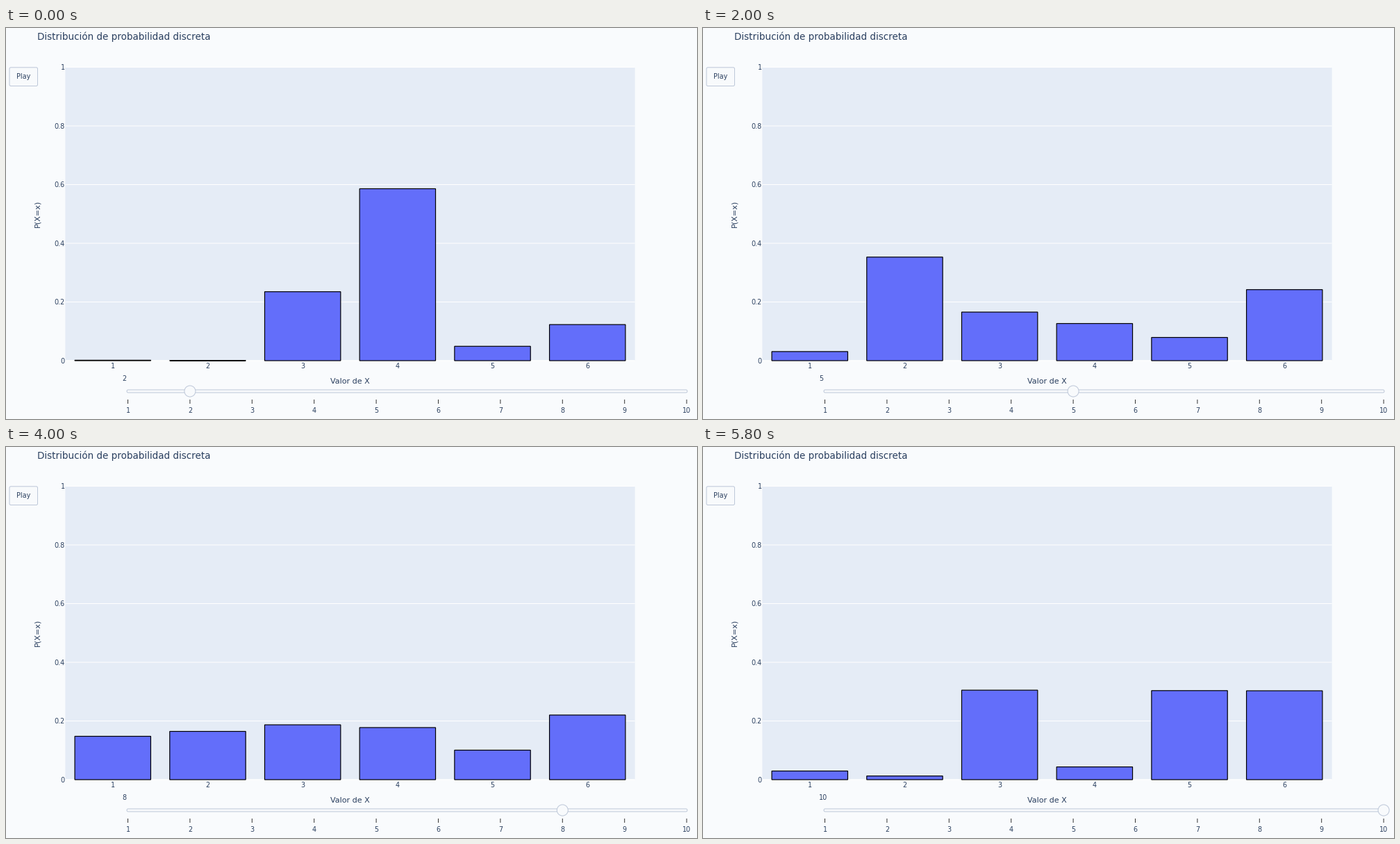
These frames come from a looping animation (995 by 563 pixels, 6.2 s). A matplotlib script:

```python
import numpy as np
import matplotlib.pyplot as plt
from matplotlib.animation import FuncAnimation
from matplotlib.patches import Circle, FancyBboxPatch, Rectangle

W, H, DPI = 995, 563, 64
STEP_MS, LOOP_MS, MOVE_MS = 100, 6200, 500

PAPER, PLOT, BAR = "#f9fbfd", "#e5ecf6", "#636efa"
INK, BORDER, CONTROL = "#2a3f5f", "#bec8d9", "#f8fafc"

LEFT, RIGHT, TOP, BASE = 85.4, 905.6, 56.5, 479
SLOT = (RIGHT - LEFT) / 6
BAR_W = 0.8 * SLOT
RAIL_X, RAIL_Y, RAIL_STEP = 175.5, 523, 89.4

# Probabilities of the six values, one row per slider position.
STATES = np.array([
    [.0015, .0005, .235, .540, .049, .123],
    [.0015, .0005, .235, .5865, .049, .123],
    [.0285, .104, .0385, .4945, .311, .020],
    [.031, .193, .197, .162, .110, .305],
    [.031, .455, .1455, .104, .0595, .202],
    [.2715, .336, .2296, .012, .0995, .0485],
    [.152, .1625, .1787, .1965, .070, .238],
    [.1095, .183, .263, .0025, .3835, .056],
    [.120, .140, .405, .060, .170, .105],
    [.0295, .0125, .305, .0435, .3035, .303],
])
# Moment at which each move to the next row begins.
STARTS = np.array([-430, 260, 1020, 1730, 2460, 3220, 3855, 4610, 5320])


def px(size):
    """Pixels to points."""
    return size * 72 / DPI


def cubic_in_out(t):
    t = min(max(t, 0), 1)
    return 4 * t**3 if t < .5 else 1 - 4 * (1 - t)**3


plt.rcParams["font.family"] = "DejaVu Sans"
plt.rcParams["path.snap"] = False
fig = plt.figure(figsize=(W / DPI, H / DPI), dpi=DPI, facecolor=PAPER)
ax = fig.add_axes([0, 0, 1, 1])
ax.set_xlim(0, W)
ax.set_ylim(H, 0)
ax.axis("off")


def label(x, y, text, size=9.6, ha="center", **kw):
    return ax.text(x, y, text, fontsize=px(size), color=INK, ha=ha,
                   va=kw.pop("va", "baseline"), **kw)


def rule(xs, ys, color, width, z=1):
    ax.plot(xs, ys, color=color, lw=px(width), zorder=z,
            solid_capstyle="butt")


def rounded(x, y, w, h, radius):
    ax.add_patch(FancyBboxPatch(
        (x, y), w, h, boxstyle=f"round,pad=0,rounding_size={radius}",
        fc=CONTROL, ec=BORDER, lw=px(1), zorder=3))


# Plot area
ax.add_patch(Rectangle((LEFT, TOP), RIGHT - LEFT, BASE - TOP, fc=PLOT, lw=0))
for i, text in enumerate(["0", "0.2", "0.4", "0.6", "0.8", "1"]):
    y = BASE - i * (BASE - TOP) / 5
    rule([LEFT, RIGHT], [y, y], "white", 1 if i else 1.6)
    label(84.8, y + 3.6, text, ha="right")

bars = []
for i in range(6):
    center = LEFT + (i + .5) * SLOT
    bar = Rectangle((center - BAR_W / 2, BASE), BAR_W, 0, fc=BAR, ec="black",
                    lw=px(1.2), joinstyle="miter", zorder=2)
    bars.append(ax.add_patch(bar))
    label(center, 490, str(i + 1))

label(45, 17, "Distribución de probabilidad discreta", 13.5, ha="left")
label(495.6, 512, "Valor de X", 11.1)
label(50, 267.8, "P(X=x)", 11.2, ha="right", va="center", rotation=90)

# Button
rounded(5, 56.8, 40.5, 26.7, 2)
label(25.2, 73.3, "Play")

# Slider
rounded(174, 521, 807, 4, 1.9)
for i in range(10):
    x = RAIL_X + i * RAIL_STEP
    rule([x, x], [535, 541], "#333333", 1)
    label(x, 553.5, str(i + 1))
grip = ax.add_patch(Circle((RAIL_X, RAIL_Y), 8, fc=CONTROL, ec=BORDER,
                           lw=px(1), zorder=4))
current = label(167.4, 508, "", ha="left")


def update(frame):
    now = frame * STEP_MS
    move = int(np.searchsorted(STARTS, now, side="right")) - 1
    progress = cubic_in_out((now - STARTS[move]) / MOVE_MS)
    values = STATES[move] + progress * (STATES[move + 1] - STATES[move])
    for bar, value in zip(bars, values):
        bar.set_height(-value * (BASE - TOP))
    grip.center = RAIL_X + (move + 1) * RAIL_STEP, RAIL_Y
    current.set_text(str(move + 2))
    return [*bars, grip, current]


anim = FuncAnimation(fig, update, frames=LOOP_MS // STEP_MS,
                     interval=STEP_MS, repeat=True, repeat_delay=0)
plt.show()
```
